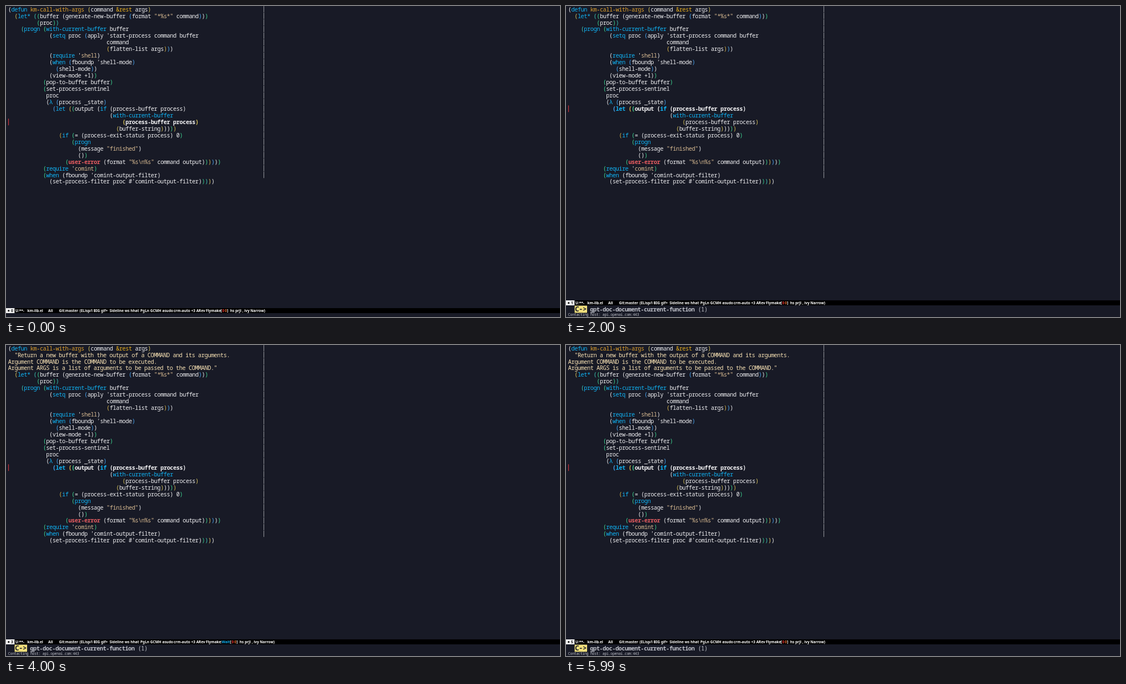
Write an HTML page with a canvas that moves like this. It is 998 by 561 pixels and loops after 6990 ms.

```html
<!DOCTYPE html>
<html lang="en">
<head>
<meta charset="utf-8">
<title>Documenting a function in an editor</title>
<style>
  html, body { margin: 0; width: 998px; height: 561px; overflow: hidden; background: #181a26; }
  canvas { display: block; width: 998px; height: 561px; }
</style>
</head>
<body>
<canvas id="stage"></canvas>
<script>
const W = 998, H = 561, LOOP = 6990;
const CELL = 5.718, ROW = 11.956, LEFT = 4;
const MONO = '"Noto Sans Mono", "DejaVu Sans Mono", monospace';
const SANS = '"Noto Sans", "Open Sans", sans-serif';

const color = {
  bg: '#181a26', text: '#f0f0f2', keyword: '#10b4f6', name: '#dfa02c', rest: '#eab01c',
  string: '#d9bb92', doc: '#f8e2b4', error: '#e65c60', cursor: '#d8363c', rule: '#96989e',
  echo: '#bec0c8', key: '#f0df7c'
};
const parens = [color.text, '#dcc85c', '#3fc8ba', '#3ed894', color.text,
                '#4aaaf8', '#dcb84c', '#3ed894', color.text];
const keywords = new Set(['defun', 'let*', 'let', 'progn', 'with-current-buffer', 'setq',
                          'require', 'when', 'λ', 'if']);

const head = '(defun km-call-with-args (command &rest args)\n';
const docs = `  "Return a new buffer with the output of a COMMAND and its arguments.
Argument COMMAND is the COMMAND to be executed.
Argument ARGS is a list of arguments to be passed to the COMMAND."
`;
const body = String.raw`  (let* ((buffer (generate-new-buffer (format "*%s*" command)))
         (proc))
    (progn (with-current-buffer buffer
             (setq proc (apply 'start-process command buffer
                               command
                               (flatten-list args)))
             (require 'shell)
             (when (fboundp 'shell-mode)
               (shell-mode))
             (view-mode +1))
           (pop-to-buffer buffer)
           (set-process-sentinel
            proc
            (λ (process _state)
              (let ((output (if (process-buffer process)
                                (with-current-buffer
                                    (process-buffer process)
                                  (buffer-string)))))
                (if (= (process-exit-status process) 0)
                    (progn
                      (message "finished")
                      ())
                  (user-error (format "%s\n%s" command output))))))
           (require 'comint)
           (when (fboundp 'comint-output-filter)
             (set-process-filter proc #'comint-output-filter)))))`;

const canvas = document.getElementById('stage');
const ctx = canvas.getContext('2d');
const dpr = window.devicePixelRatio || 1;
canvas.width = W * dpr;
canvas.height = H * dpr;
ctx.scale(dpr, dpr);

function rect(x, y, w, h, fill) {
  ctx.fillStyle = fill;
  ctx.fillRect(x, y, w, h);
}

function text(str, x, y, fill, size, bold, family = SANS) {
  ctx.font = `${bold ? 'bold ' : ''}${size}px ${family}`;
  ctx.fillStyle = fill;
  ctx.fillText(str, x, y);
}

// Monospaced text, tracked so that each glyph is centred in its cell.
function mono(str, x, y, fill, cell, bold) {
  const size = cell * 1.81;
  const tracking = cell - size * 0.6;
  ctx.letterSpacing = `${tracking}px`;
  text(str, x + tracking / 2, y, fill, size, bold, MONO);
  ctx.letterSpacing = '0px';
}

const code = (str, x, y, fill, bold) => mono(str, x, y, fill, CELL, bold);

function wordColor(word, last) {
  if (keywords.has(word)) return color.keyword;
  if (word === 'user-error') return color.error;
  if (word === '&rest') return color.rest;
  if (last === 'defun') return color.name;
  if (last === 'require') return color.string;
  return color.text;
}

// Split source into coloured pieces placed on the character grid.
function layout(source) {
  const pieces = [];
  let row = 0, col = 0, depth = 0, last = '';
  for (const token of source.match(/"[^"]*"|[()']|\s+|[^\s()"']+/g)) {
    let fill = color.text;
    if (token === '(') fill = parens[depth++ % parens.length];
    else if (token === ')') fill = parens[--depth % parens.length];
    else if (token[0] === '"') fill = token.includes('\n') ? color.doc : color.string;
    else if (token.trim() && token !== "'") {
      fill = wordColor(token, last);
      last = token;
    }
    token.split('\n').forEach((part, i) => {
      if (i) { row++; col = 0; }
      if (part.trim()) pieces.push({ part, row, col, fill, strong: token === 'user-error' });
      col += part.length;
    });
  }
  return { pieces, rows: row + 1 };
}

const plain = layout(head + body);
const documented = layout(head + docs + body);

function drawCode({ pieces, rows }, current) {
  for (const p of pieces) {
    code(p.part, LEFT + p.col * CELL, p.row * ROW + 9.6, p.fill, p.strong || p.row === current);
  }
  for (let i = 0; i < rows - 1; i++) rect(464, i * ROW + 0.2, 1, ROW - 0.7, color.rule);
  rect(4, current * ROW, 1.1, ROW, color.cursor);
}

function drawModeLine(top, count, waiting) {
  const put = (str, x, fill = '#fff') => text(str, x, top + 7, fill, 6.5, true);
  rect(0, top, W, 9, '#000');
  rect(0, top, 15.4, 9, '#f2f2f2');
  ctx.fillStyle = '#111';
  ctx.beginPath();
  ctx.arc(4.8, top + 4.7, 1.6, 0, Math.PI * 2);
  ctx.fill();
  put(count, 9, '#111');
  put('U:**-', 17);
  put('km-lib.el', 38.5);
  put('All', 76);
  put('Git:master', 95.5);
  put('(ELisp/l BIG gif+', 132.5);
  put('Sideline ws hhat', 186.5);
  put('PgLn GCMH asudo', 242);
  put('crm-auto +3 ARev', 302);
  put('Flymake', 360);
  const shift = waiting ? 17 : 0;
  if (waiting) {
    put(':', 386.6);
    put('Wait', 388.6, color.keyword);
  }
  put('[', 386.8 + shift);
  put('0', 389.4 + shift, '#f0302c');
  put('0', 394.3 + shift, '#e8702c');
  put(']', 398.2 + shift);
  put('hs prjl , ivy Narrow)', 403.8 + shift);
}

function drawEcho(key, command, times) {
  rect(15.6, 540.6, 22.4, 12.8, color.key);
  mono(key, 16.5, 550.6, color.bg, 6.9, true);
  code(command, 43.5, 550.6, color.echo, true);
  code(`(${times})`, 43.5 + (command.length + 1) * CELL, 550.6, color.echo);
}

function draw(t) {
  const step = [1000, 2000, 3000, 4000, 5000, 5990].filter(start => t >= start).length;
  const done = step >= 4;
  rect(0, 0, W, H, color.bg);
  drawCode(done ? documented : plain, done ? 18 : step ? 15 : 17);
  drawModeLine(step ? 531 : 545, Math.max(0, step - 1), step === 4 || step === 5);
  if (step === 1) drawEcho('C-p', 'previous-line', 2);
  if (step >= 2) {
    drawEcho('C->', 'gpt-doc-document-current-function', 1);
    mono('Contacting host: api.openai.com:443', LEFT, 559.4, color.echo, 3.65);
  }
}

function tick() {
  draw(performance.now() % LOOP);
  requestAnimationFrame(tick);
}
tick();
</script>
</body>
</html>
```
